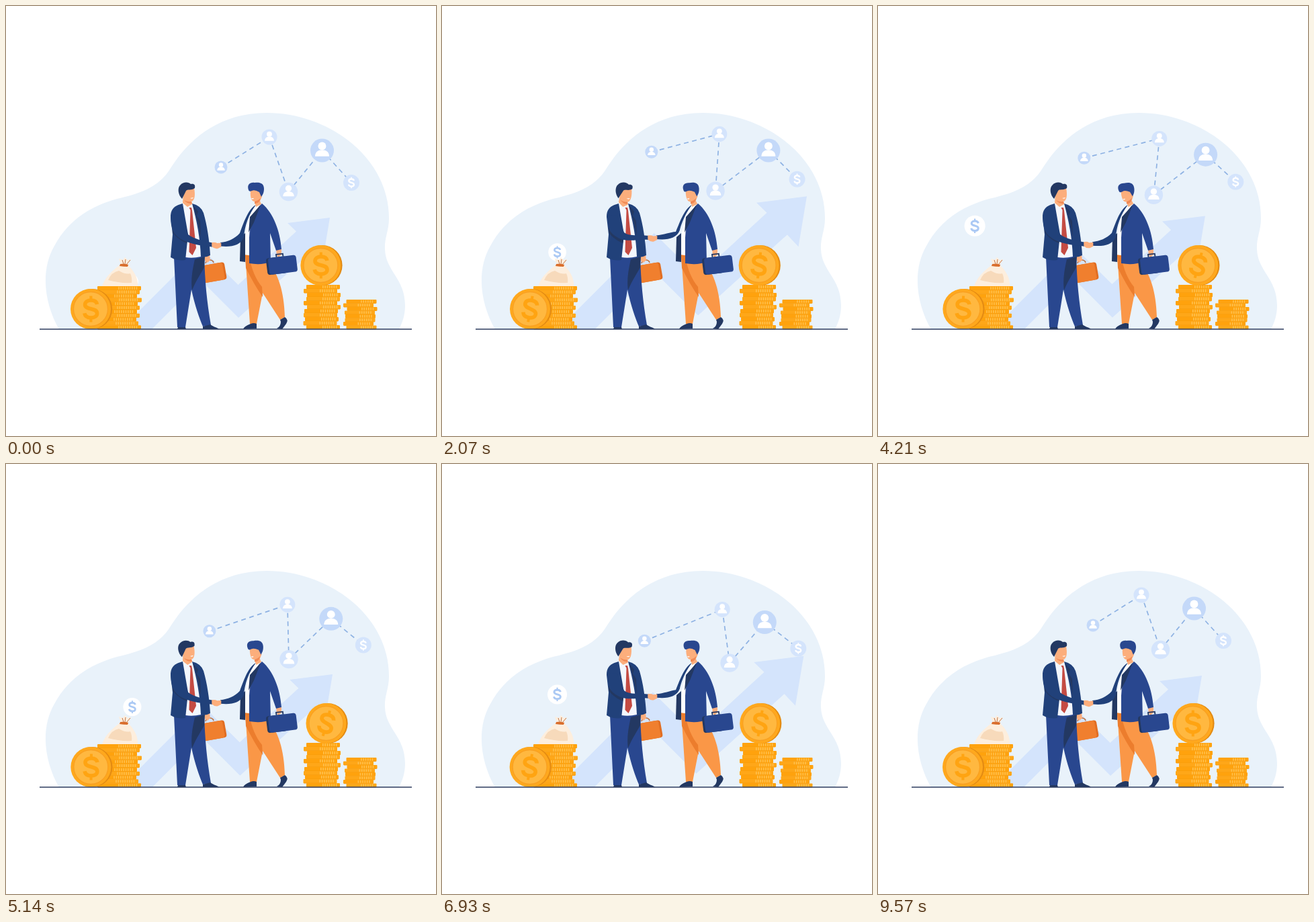
Recreate the animation shown at these times as an HTML page. Size 640 by 640 pixels, loop 9640 ms.

```html
<!DOCTYPE html>
<html lang="en">
<head>
<meta charset="utf-8">
<style>
html, body { margin: 0; width: 100%; height: 100%; overflow: hidden; background: #fff; }
svg { display: block; width: 100vw; height: 100vh; }
.navy { fill: #21417a; } .blue { fill: #29478f; } .dark { fill: #233862; }
.skin { fill: #fcae7c; } .white { fill: #fff; } .sky { fill: #d4e4fc; }
.wire { fill: none; stroke: #8eb2e3; stroke-width: 1.7; stroke-dasharray: 7 5.5; }
</style>
</head>
<body>
<svg viewBox="0 0 640 640">
  <defs>
    <g id="dollar">
      <path d="M9.2-7C8.4-11.3 4.8-13 .2-13C-5-13-8.8-10.5-8.8-6.6C-8.8 1.8 9.2-2.4 9.2 6.4C9.2 10.6 5.2 13 0 13C-5.2 13-8.7 10.9-9.6 6.3" fill="none" stroke="currentColor" stroke-width="5.6"/>
      <path d="M0-19.5V-13M0 13V19.5" stroke="currentColor" stroke-width="4"/>
    </g>
    <g id="person" class="white">
      <circle cy="-.37" r=".34"/>
      <path d="M-.6 .5C-.6 .12-.33-.04 0-.04S.6 .12 .6 .5Z"/>
    </g>
    <g id="coin">
      <circle cx="1.8" r="30" fill="#e38b13"/>
      <circle cx="-.4" r="30" fill="#ffa81d"/>
      <circle cx="-.4" r="25.5" fill="#ffb840" stroke="#f9a021" stroke-width="1.3"/>
    </g>
  </defs>

  <path fill="#e9f2fa" d="M79 481C58 445 50 395 72 357C95 315 130 297 165 287C200 279 225 270 242 246C262 213 305 159 388 159C480 159 570 225 570 316C570 335 563 345 564 362C565 395 594 405 594 446C594 460 590 471 585 481Z"/>
  <clipPath id="above"><path d="M0 0H640V481H0Z"/></clipPath>
  <g clip-path="url(#above)">
    <path id="arrow" class="sky" d="M170 482L291 361L345.5 415L432 335.5L419 323L482 315L471.5 378L457.5 363L346 464L290 408L200 498Z"/>
  </g>
  <g id="net"></g>
  <g id="bubbles"></g>

  <g id="stacks"></g>
  <path fill="#fdeedd" d="M143 417C147 404 159 393 169 386H182C190 394 197 405 196 417Z"/>
  <path fill="#f7dabb" d="M152 408Q157 396 168 394Q178 400 185 398Q188 405 187 412Q170 413 152 408Z"/>
  <path fill="#fdeedd" d="M171 385L168 376L174 378L177 374L181 378L186 377L181 386Z"/>
  <path fill="none" stroke="#b9683a" stroke-width=".9" d="M175 384L173 378M177 384L178 377M179 385L185 378"/>
  <path fill="#d96d2b" d="M170 384Q176 383 182 385L181 388Q175 388 169 387Z"/>
  <g id="leftCoin"></g>
  <g id="rightCoin"></g>

  <!-- left man -->
  <path d="M297 383Q298 378 303 378Q308 378 309 382" fill="none" stroke="#bd713f" stroke-width="1.6"/>
  <rect x="288" y="384" width="39" height="26" rx="4" fill="#e16e22" transform="rotate(-10 308 397)"/>
  <rect x="286" y="384" width="38" height="26" rx="4" fill="#f07f2e" transform="rotate(-10 308 397)"/>
  <path class="skin" d="M295 372L303 371L304 378L300 382L296 379Z"/>
  <path class="blue" d="M250 374L255 478H267L276 422C281 446 288 465 293 477L305 475C299 440 296 410 295 371Z"/>
  <path class="dark" d="M296 373L281 377C277 395 275 408 277 423C283 408 291 397 295 389Z"/>
  <path class="dark" d="M256 478H267L268 481H255ZM293 477L304 474C309 478 314 478 317 481H293Z"/>
  <path fill="#f3f7fe" d="M263 293L277 294L290 340V373Q278 376 267 374Z"/>
  <path fill="#c44b43" d="M272.5 300H276L277 304L283 360L277.5 371L272.5 366L274.5 304Z"/>
  <path class="navy" d="M263 294C252 297 245 301 245 314L248 340L245 374Q254 380 267 378L271 340Z"/>
  <path class="dark" d="M248 326L270 348L269 353Q255 347 248 337Z"/>
  <path class="navy" d="M277 294Q290 297 294 308C299 325 303 350 304 371Q297 375 290 373C289 345 284 320 277 294Z"/>
  <path class="dark" d="M278 296L286 306L284 312L289 320L290 345C287 325 284 313 278 296Z"/>
  <path id="leftArm" class="navy"/>
  <g id="leftHead">
    <path class="skin" d="M264 275L280 271C282 281 281 290 276 291L277 295L270 299L263 293Z"/>
    <path fill="#f18a55" d="M265 289Q270 292 276 291L277 294Q270 295 265 289Z"/>
    <path class="dark" d="M262 287C256 281 255 271 259 267C264 261 272 262 275 265C280 264 282 266 281 271C276 275 270 272 268 275L265 281Z"/>
    <path class="white" d="M274 286L279 285Q278 288 274 286Z"/>
  </g>

  <!-- right man -->
  <path fill="#fa9747" d="M356 369L363 473H373L382 427L408 467L415 463C414 425 405 397 390 382Z"/>
  <path fill="#ec7d2d" d="M357 390Q370 416 382 433L381 418C372 407 365 392 362 371H356Z"/>
  <path class="dark" d="M364 473Q369 471 373 473V480L353 481Q354 477 364 473ZM408 467L415 463Q421 467 417 473L411 481L403 480Q409 477 409 470Z"/>
  <path class="white" d="M371 296H380C366 312 363 335 362 371L355 370C355 345 358 315 371 296Z"/>
  <path class="dark" d="M356 338L349 344L348 380L356 381Z"/>
  <path id="rightArm" class="navy"/>
  <path class="skin" d="M402 363L410 362L410 370L405 375L403 370Z"/>
  <path class="blue" d="M381 294C368 305 363 325 362 345V383Q380 386 394 381L393 338L402 364L410 362C408 335 398 308 381 294Z"/>
  <path class="dark" d="M379 296L363 314L361 337L369 322Z"/>
  <g transform="rotate(-7 410 386)">
    <path d="M404 373V369H414V373" fill="none" stroke="#233862" stroke-width="1.8"/>
    <rect x="388" y="373" width="30" height="25" rx="4" class="dark"/>
    <rect x="391" y="373" width="42" height="25" rx="4" class="blue"/>
  </g>
  <g id="rightHead">
    <path class="skin" d="M364 273L379 272L381 284L378 290L380 295L372 299L370 291C365 291 363 284 364 273Z"/>
    <path fill="#f18a55" d="M370 291Q375 290 379 286L377 291Q373 295 370 294Z"/>
    <path class="blue" d="M361 274C358 265 364 262 370 263C378 262 384 264 384 272C384 278 382 281 380 284L377 277Q370 273 366 275Q362 277 361 274Z"/>
    <path class="white" d="M365 286L369 286Q367 289 365 286Z"/>
  </g>
  <path id="hands" class="skin" d="M-7-4Q-2-5 1-3L7-3.5L7 2.5L2 5Q-3 6-7 2Z"/>
  <path d="M50 481H604" stroke="#2d3b5e" stroke-width="1.6"/>
</svg>
<script>
const LOOP = 9.64;
const $ = id => document.getElementById(id);
const put = (id, name, value) => $(id).setAttribute(name, value);
const mix = (a, b, p) => a + (b - a) * p;

// Eased keyframes: values hold beyond the last time.
function track(t, times, values) {
  const i = times.findIndex(time => t < time);
  if (i < 0) return values[values.length - 1];
  const p = (t - times[i - 1]) / (times[i] - times[i - 1]);
  return mix(values[i - 1], values[i], (1 - Math.cos(Math.PI * p)) / 2);
}

const dollar = (size, color) => `<use href="#dollar" color="${color}" transform="scale(${size})"/>`;

// Each node: radius, colour, x keys, y keys.
const nodes = [
  [9.5, '#c4d9f9', [320, 309.5, 300, 320], [240, 211, 265, 240]],
  [11.5, '#d4e4fc', [392, 418.7, 419, 392], [195, 189.3, 218, 195]],
  [13.7, '#d4e4fc', [420.5, 403.3, 428.6, 420.5], [276.5, 274.8, 297.5, 276.5]],
  [17.5, '#c4d9f9', [470.5, 490.2, 481, 470.5], [215, 215, 237, 215]],
  [12, '#d4e4fc', [514, 532.6, 531.5, 514], [263, 256.3, 275.3, 263]]
];
const nodeTimes = [0, 3, 6.4, 9.57];

function drawNet(t) {
  const at = nodes.map(([, , xs, ys]) => [track(t, nodeTimes, xs), track(t, nodeTimes, ys)]);
  const wires = at.slice(1).map((p, i) => `<path class="wire" d="M${at[i]}L${p}"/>`);
  const dots = nodes.map(([r, color], i) => `<g transform="translate(${at[i]})">
    <circle r="${r}" fill="${color}"/>
    ${i < 4 ? `<use href="#person" transform="scale(${r})"/>` : dollar(.42, '#fff')}</g>`);
  $('net').innerHTML = wires.concat(dots).join('');
}

function drawBubbles(t) {
  let out = '';
  for (let i = 0; i < 6; i++) {
    const q = (t - 1.5 * i) / 2;
    if (q < 0 || q >= 1) continue;
    const lane = [190, 171.5, 143][i % 3], left = 1 - q;
    const x = lane + (172 - lane) * .25 * left * left;
    const y = 300 + 110 * left ** 1.5;
    const r = 11.3 + 7 * q;
    out += `<g transform="translate(${x} ${y})" opacity="${Math.min(1, left / .14)}">
      <circle r="${r}" class="white"/>${dollar(r / 28, '#abc9f4')}</g>`;
  }
  $('bubbles').innerHTML = out;
}

function drawStack(top, width, lefts) {
  const h = (481 - top) / lefts.length;
  return lefts.map((x, i) => {
    const y = top + i * h, mid = y + h / 2;
    return `<rect x="${x}" y="${y}" width="${width}" height="${h + .2}" rx="1" fill="${i % 2 ? '#ffa718' : '#ffa20d'}"/>
      <path d="M${x + width * .48} ${mid}H${x + width * .92}" stroke="#ffc04d" stroke-width="${h - 1.6}" stroke-dasharray="1.6 1.7"/>
      <path d="M${x + 1} ${y + h}H${x + width - 1}" stroke="#f19708" stroke-width=".7"/>`;
  }).join('');
}

function drawCoin(id, x, y, shift) {
  $(id).innerHTML = `<g transform="translate(${x + shift} ${y})"><use href="#coin"/>
    <g transform="rotate(${shift / 30 * 180 / Math.PI})">${dollar(1, '#ffa412')}</g></g>`;
}

function draw(t) {
  const rise = track(t, [0, 2.08, 4.69, 7.42, 9.57], [0, 1, 0, 1, 0]);
  put('arrow', 'transform', `translate(161 482) scale(${1 + .19 * rise}) translate(-161 -482)`);
  drawNet(t);
  drawBubbles(t);
  drawCoin('leftCoin', 126.4, 451, 5 * rise);
  drawCoin('rightCoin', 468.8, 386, track(t, [0, 4.8, 9.57], [0, 8.2, 0]));

  const y = 356 - 10.5 * rise, elbow = 349 - 3 * rise, side = 245 + 1.5 * rise;
  put('leftArm', 'd', `M${side} 311C${side} 330 248 ${elbow - 8} 264 ${elbow}C278 ${elbow + 6} 292 ${y + 1} 307 ${y + 2.5}L308 ${y - 3.5}C294 ${y - 6} 280 ${elbow - 2} 271 ${elbow - 9}L261 312Z`);
  put('rightArm', 'd', `M372 296C360 302 353 325 348 ${338 - 2 * rise}C340 ${y - 9} 330 ${y - 5} 319 ${y - 4}L319 ${y + 1.5}C335 ${y + 3} 349 ${y + 1} 354 ${y - 12}C355 328 361 310 372 296Z`);
  put('hands', 'transform', `translate(313.3 ${y})`);

  const nod = track(t, [0, 1.6, 5.4, 7.7, 9.57], [0, 6.5, -1.5, 6.5, 0]);
  const tilt = track(t, [0, 1.5, 2.9, 4.4, 6, 7.8, 9.57], [0, -6, 0, -7.5, 2.2, -5, 0]);
  put('leftHead', 'transform', `rotate(${nod} 270 292)`);
  put('rightHead', 'transform', `rotate(${tilt} 374 293)`);
}

$('stacks').innerHTML =
  drawStack(417, 65, [136, 134, 130, 137, 131, 134, 130, 134, 129, 132, 136]) +
  drawStack(415, 50, [447, 443, 448, 447, 443, 448, 444, 443, 445, 442.5, 447]) +
  drawStack(437, 45, [506.5, 502, 507.5, 504, 505, 504.5, 502, 506.5]);

function frame() {
  draw(performance.now() / 1000 % LOOP);
  requestAnimationFrame(frame);
}
frame();
</script>
</body>
</html>
```
